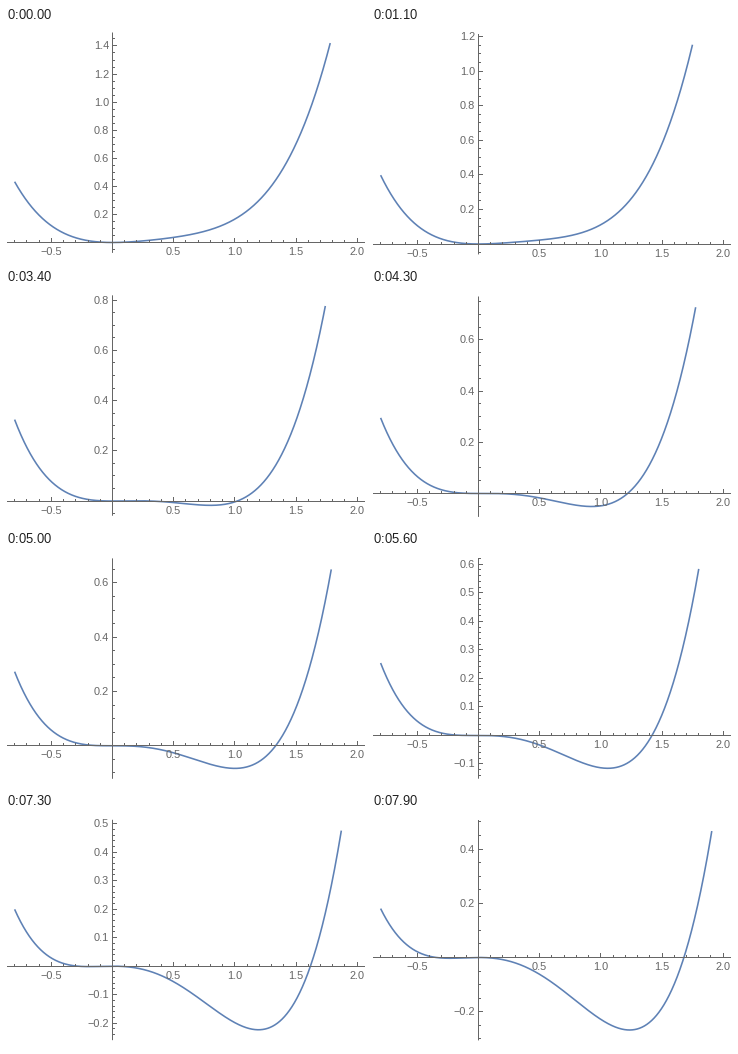
Animation, 360 px wide and 234 px high, one loop 8000 ms. Source, as a matplotlib script:

```python
import numpy as np
import matplotlib.pyplot as plt
from matplotlib.animation import FuncAnimation

W, H, DPI = 360, 234, 100
PX = 72 / DPI
FRAMES = 80
GRAY, BLUE = "#666666", "#5e81b5"
X0, X_UNIT = 106.5, 122.35
PLOT_H, PAD = 199.6, 10.4

plt.rcParams["font.family"] = "Liberation Sans"

fig = plt.figure(figsize=(W / DPI, H / DPI), dpi=DPI, facecolor="white")
ax = fig.add_axes([0, 0, 1, 1])

xs = np.linspace(-0.8, 2, 3000)

# Automatic plot range: where the right branch is cut, and the lower margin
KEYS = [0, 11, 24, 36, 43, 56, 66, 79]
CUT_X = [1.780, 1.7495, 1.7245, 1.743, 1.7755, 1.8005, 1.828, 1.9075]
BASE = [214.5, 216, 214.5, 215.5, 216.5, 216.3, 215.5, 216]


def potential(x, c):
    return x**4 / 4 - x**3 / 3 + c * x**2 / 2


def px(x):
    return X0 + X_UNIT * x


def mid(v):
    """Centre of the pixel that holds v."""
    return np.floor(v) + 0.5


def ticks(lo, hi, step):
    k = np.arange(np.ceil(lo / step - 1e-9), np.floor(hi / step + 1e-9) + 1)
    return k * step


def is_multiple(v, step):
    return abs(v / step - round(v / step)) < 1e-6


def label(x, y, value, **align):
    text = f"{value:.1f}".replace("-", "\u2212")
    ax.text(x, y, text, color=GRAY, size=11 * PX, va="baseline", **align)


def segments(parts):
    pts = [p for a, b in parts for p in (a, b, (np.nan, np.nan))]
    ax.plot(*zip(*pts), color=GRAY, lw=PX, snap=False, solid_capstyle="butt")


def draw(i):
    ax.clear()
    ax.set(xlim=(0, W), ylim=(H, 0))
    ax.axis("off")

    c = 0.5 - 0.01 * i
    cut = np.interp(i, KEYS, CUT_X)
    base = np.interp(i, KEYS, BASE)
    x = xs[xs <= cut]
    y = potential(x, c)
    low, high = y.min(), potential(cut, c)
    unit = PLOT_H / (high - low)

    def py(v):
        return base - (v - low) * unit

    bottom, top = base + PAD, base - PLOT_H - PAD
    margin = PAD / unit
    axis_y = mid(py(0))

    ax.plot(px(x), py(y), color=BLUE, lw=1.6 * PX, solid_capstyle="butt")

    lines = [((1, axis_y), (359, axis_y)), ((X0, top), (X0, bottom))]
    for t in ticks(-0.8, 2, 0.1):
        major = is_multiple(t, 0.5)
        tx = mid(px(t))
        lines.append(((tx, axis_y), (tx, axis_y - (4.5 if major else 2.5))))
        if major and abs(t) > 0.01:
            label(px(t) - 0.5, axis_y + 12.5, t, ha="center")

    step, minor = (0.2, 0.05) if high - low > 0.715 else (0.1, 0.02)
    for t in ticks(low - margin, high + margin, minor):
        major = is_multiple(t, step)
        ty = mid(py(t))
        lines.append(((X0, ty), (X0 + (4.5 if major else 2.5), ty)))
        if major and abs(t) > 0.01:
            label(X0 - 3.5, ty + 3.5, t, ha="right")
    segments(lines)
    return ax.get_children()


anim = FuncAnimation(fig, draw, frames=FRAMES, interval=100,
                     repeat=True, repeat_delay=0, blit=False)
plt.show()
```
